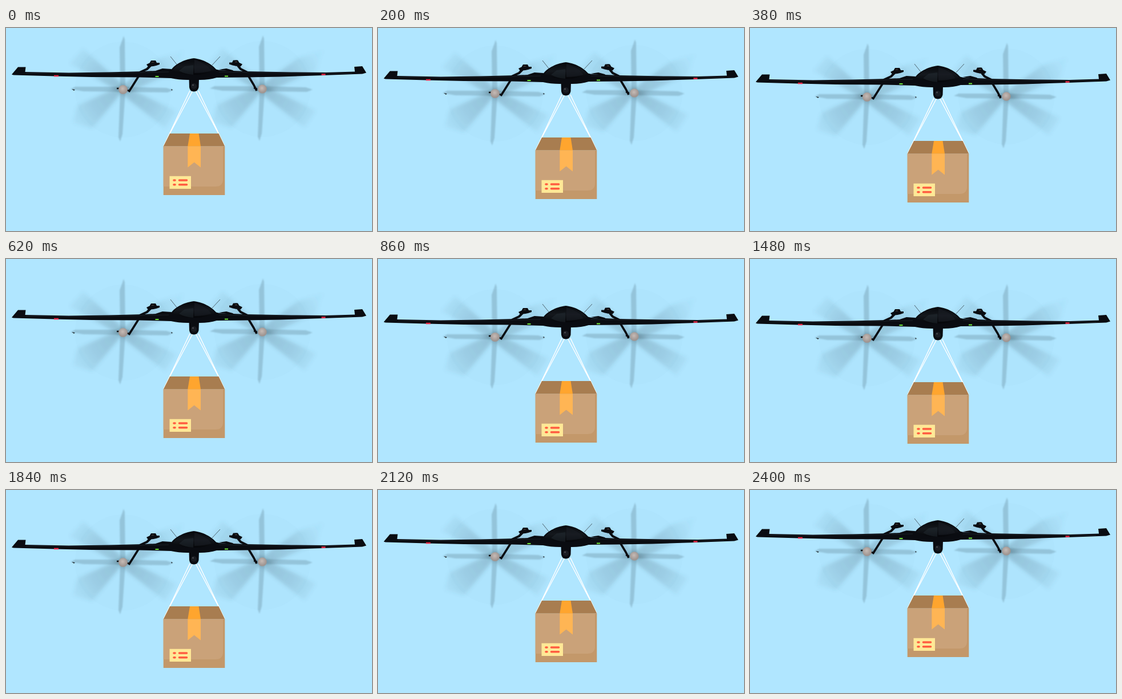
Write an HTML page that moves like this. It is 641 px wide and 356 px high and loops after 2420 ms.

```html
<!DOCTYPE html>
<html lang="en">
<head>
<meta charset="utf-8">
<title>Delivery drone</title>
<style>
  html, body { margin: 0; width: 100%; height: 100%; overflow: hidden; background: #b0e6ff; }
  svg { display: block; width: 100vw; height: 100vh; }
</style>
</head>
<body>
<svg viewBox="0 0 641 356">
  <defs>
    <filter id="soft" x="-20%" y="-20%" width="140%" height="140%"><feGaussianBlur stdDeviation="3"/></filter>
    <filter id="edge" x="-20%" y="-20%" width="140%" height="140%"><feGaussianBlur stdDeviation=".9"/></filter>
    <radialGradient id="fade" gradientUnits="userSpaceOnUse" cx="0" cy="0" r="112">
      <stop offset="0" stop-color="#324c58" stop-opacity=".24"/>
      <stop offset=".55" stop-color="#3c5c6a" stop-opacity=".16"/>
      <stop offset="1" stop-color="#4a6e7e" stop-opacity=".03"/>
    </radialGradient>
    <linearGradient id="dome" x2="0" y2="1">
      <stop offset="0" stop-color="#07090d"/>
      <stop offset=".5" stop-color="#14181d"/>
      <stop offset="1" stop-color="#050609"/>
    </linearGradient>
    <radialGradient id="ball" cx=".45" cy=".4">
      <stop offset="0" stop-color="#c6bbb6"/>
      <stop offset="1" stop-color="#a09692"/>
    </radialGradient>
    <g id="rotor">
      <circle r="84" fill="#557c8e" opacity=".02"/>
      <g fill="url(#fade)" filter="url(#soft)">
        <path d="M-4 5L-94-46L-70-72L5-4Z"/>
        <path d="M-5-5L62-54L106-68L94-32L6 6Z"/>
        <path d="M5-5L94 38L74 68L-5 6Z"/>
        <path d="M5-4L-54 68L-88 58L-80 28L-5-6Z"/>
      </g>
      <g fill="#4b6b79" opacity=".26" filter="url(#edge)">
        <path d="M-5-4L-6-74L1-94L3-88L4-4Z"/>
        <path d="M-5 3L-8 84L-5 91L-1 78L4 3Z"/>
        <path d="M-2-5L-84-5L-92-1L-70 3L-2 4Z"/>
        <path d="M2-5L76-3L88 1L78 5L2 4Z"/>
      </g>
    </g>
    <g id="rear">
      <path d="M-12 2L-6-1L-4-5L4-5L6-1L11-1L11 2L5 4L0 5L-9 6Z"/>
      <circle cx="-1" r="5"/>
      <path d="M-3-2h4" stroke="#5a4840" stroke-width="1"/>
    </g>
  </defs>

  <g id="craft">
    <use href="#rotor" x="205" y="108"/>
    <use href="#rotor" x="449" y="107"/>
    <path d="M115 107l6 1l-2 2zM289 107l3 1l-2 2z" fill="#28343a"/>

    <path d="M322 110L276 207M327 110L287 185M332 110L372 185M337 110L383 207" stroke="#fff" stroke-width="1.4"/>

    <g fill="#0a0c11">
      <use href="#rear" x="258" y="62"/>
      <use href="#rear" transform="translate(402 61.5)scale(-1 1)"/>
      <g fill="none" stroke="#0a0c11" stroke-linejoin="round">
        <path d="M253 66L247 72L234 78M406 66L411 72L423 78" stroke-width="4"/>
        <path d="M232 85L222 101L215 112M425 85L434 100L439 110" stroke-width="3.6"/>
        <path d="M194 106h8M211 109l6 1M434 105l6 2" stroke-width="2.6"/>
        <path d="M288 50L300 65M375 50L361 65" stroke="#46565f" stroke-width=".9"/>
      </g>
      <path d="M262 75L274 71L290 72L288 77ZM372 73L386 71L397 74L401 77Z"/>
      <path d="M10 81.5L21 68.5H34.5L33.5 77L110 78.5L180 77.5L240 76L285 74L290 72.5C294 66 310 55 329 53C348 55 363 66 368 72.5L374 74L420 76L500 77.5L560 78L611 76.5L610 68L624 67L631 78.5L624 80.5L556 83L480 85.5L420 86.5L369 87Q356 91 340 91H318Q302 91 289 88L235 86.5L150 86L85 84.5L13 82.5Z"/>
      <path d="M320.5 89H338L337.5 104Q336 111.5 329 111.5Q322 111.5 321 104Z"/>
    </g>
    <path d="M292 74C297 66 311 56 329 54.5C347 56 361 66 366 74Q348 83 329 82Q310 83 292 74Z" fill="url(#dome)"/>
    <path d="M330 56Q344 60 353 67L360 75Q346 79 330 79Z" fill="#1b1f26" opacity=".55"/>
    <path d="M303 75L313 67L328 65V82Q313 81 303 75Z" fill="#29313a" opacity=".4"/>
    <path d="M35 79L140 80L285 77M373 77L500 79L606 79.5" fill="none" stroke="#20262d" stroke-width=".8"/>
    <circle cx="329" cy="102" r="5" fill="#191c22"/>
    <circle cx="327.5" cy="100" r="1.5" fill="#46464b"/>

    <path d="M84 84h8M552.5 81.5h7" stroke="#e92947" stroke-width="2.3"/>
    <path d="M261.5 85h6M383 84.5h6" stroke="#70e83a" stroke-width="2.2"/>
    <g fill="url(#ball)"><circle cx="205" cy="108" r="8"/><circle cx="449" cy="107" r="7.7"/></g>

    <path d="M287 185H372.5L383.3 207.5H275.7Z" fill="#a87d50"/>
    <path d="M275.7 207.5H383.3V293H275.7Z" fill="#c3986a"/>
    <path d="M275.7 207.5H380V265Q380 278 367 278H275.7Z" fill="#caa279"/>
    <path d="M322 185H337.5L341 207.5H318.3Z" fill="#ffa52e"/>
    <path d="M318.3 207.5H341V244.5L329.6 235.5L318.3 244.5Z" fill="#ffb554"/>
    <path d="M286.5 259.7H324V282H286.5Z" fill="#ffe896"/>
    <path d="M294 267h2M303.5 267h13M294 274.7h2M303.5 274.7h13" stroke="#ff5c40" stroke-width="3.6" stroke-linecap="round"/>
  </g>
</svg>
<script>
  const STEP = 20, LOOP = 2420, LAST = LOOP - STEP, DROP = 40;
  const craft = document.getElementById("craft");

  // Sinks and rises at constant speed, in whole pixels.
  function draw(now) {
    const t = Math.floor(now % LOOP / STEP) * STEP;
    const y = Math.round(DROP * (1 - Math.abs(1 - 2 * t / LAST)));
    craft.setAttribute("transform", `translate(0 ${y})`);
    requestAnimationFrame(draw);
  }
  draw(0);
</script>
</body>
</html>
```
